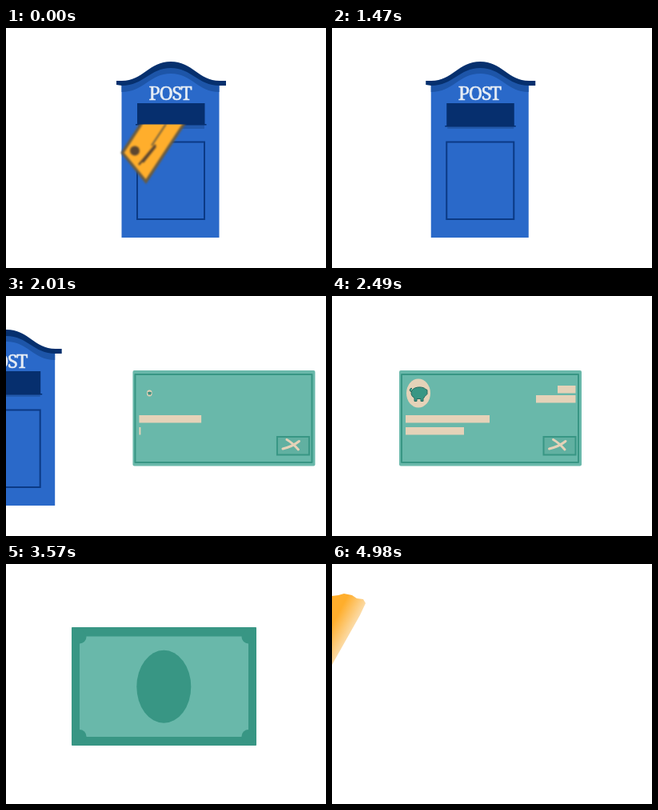
These frames come from a looping animation (400 px wide and 300 px high, 5.01 s). An HTML page:

```html
<!DOCTYPE html>
<html lang="en">
<head>
<meta charset="utf-8">
<title>Post box</title>
<style>
html, body { margin: 0; height: 100%; overflow: hidden; background: #fff; }
svg { display: block; width: 100vw; height: 100vh; }
.light { fill: #69b8aa; }
.dark { fill: #389684; }
.paper { fill: #e5d2b8; }
.soft { filter: blur(.8px); }
</style>
</head>
<body>
<svg viewBox="0 0 400 300">
  <defs>
    <clipPath id="below"><path d="M0 120.5H400V300H0z"/></clipPath>
    <linearGradient id="fade" gradientUnits="userSpaceOnUse" x1="0" y1="76" x2="24" y2="89">
      <stop offset="0" stop-color="#ffae2c"/>
      <stop offset="1" stop-color="#fbe0b4"/>
    </linearGradient>
  </defs>

  <g id="box">
    <path fill="#2a69c9" d="M144.500 70C172 70 180 46 206 46S240 70 266.500 70V262H144.500z"/>
    <path fill="#1d55a8" d="M144.500 70C172 70 180 46 206 46S240 70 266.500 70V80C240 80 232 57 206 57S172 80 144.500 80z"/>
    <path fill="#06306e" d="M138 66H145C171 66 179 42 206 42S241 66 267 66H275V72H267C240 72 232 50 206 50S172 72 145 72L138 71z"/>
    <text x="205" y="90" text-anchor="middle" font-family="'Noto Serif', serif" font-size="23.500" letter-spacing="-1.400" fill="#e6edf5" stroke="#e6edf5" stroke-width=".6">POST</text>
    <path fill="#2259ac" d="M165 119H248V126H165z"/>
    <path id="slot" fill="#062f6e"/>
    <path fill="none" stroke="#0b3a85" stroke-width="2" d="M164 142.500H248V239H164z"/>
  </g>

  <g clip-path="url(#below)">
    <g id="card" class="soft">
      <path fill="#ffae2c" stroke="#6b5c40" stroke-width="3.500" d="M145.500 156L175 192L240 93 210 57z"/>
      <ellipse cx="161" cy="153.500" rx="6" ry="6" fill="#5c4630"/>
      <path fill="none" stroke="#5c4630" stroke-width="2.500" d="M166 171L187 146M171 168L187 148"/>
      <path fill="none" stroke="#6b5c40" stroke-width="2" d="M182 147L200 120"/>
    </g>
    <g id="bill" class="soft"></g>
  </g>

  <g id="doc">
    <rect id="edge" class="light" rx="2"/>
    <rect id="frame" class="dark" rx="1"/>
    <rect id="inner" class="light"/>
    <g id="cheque">
      <g id="logo">
        <ellipse class="paper" rx="15" ry="18"/>
        <path class="dark" stroke="#246b60" d="M-9 0C-9 -9 6 -9 9 -5L11 -4V1L8 4 6 7V10H3V7H-2V10H-5V6C-8 4 -9 2 -9 0zM-9 -2C-12 -2 -11 -7 -8 -6"/>
      </g>
      <g id="bars" class="paper"></g>
      <rect x="264.500" y="176" width="40" height="22.500" fill="#61b0a1" stroke="#389684" stroke-width="2"/>
      <path fill="none" stroke="#e5d2b8" stroke-width="3" stroke-linecap="round" d="M271.500 191Q284 188 292 181.500M276.500 179.500Q283 183 291 192"/>
    </g>
    <g id="corners" class="dark"></g>
    <ellipse id="oval" class="dark" cx="197.300" cy="153.300"/>
  </g>

  <path id="smear" fill="url(#fade)" d="M0 40L8 39 15 37 25 39 31 43 39 44 42 49 35 64 0 126z"/>
</svg>
<script>
const LOOP = 5010;
const $ = id => document.getElementById(id);
const set = (el, attrs) => { for (const k in attrs) el.setAttribute(k, attrs[k]); };
const show = (id, on) => $(id).setAttribute('visibility', on ? 'visible' : 'hidden');
const move = (id, x, y = 0) => $(id).setAttribute('transform', `translate(${x} ${y})`);
const part = (t, a, b) => Math.min(1, Math.max(0, (t - a) / (b - a)));
const smooth = p => p * p * (3 - 2 * p);
const out = p => 1 - (1 - p) ** 2;

// x, y, width, start of growth, anchored right
const BARS = [[92, 149, 105, 1900], [92, 164, 73, 2007], [282, 112, 22.5, 2100, 1], [255, 124, 49.5, 2170, 1]];
const CORNERS = [[92, 91], [303, 91], [92, 215.5], [303, 215.5]];

$('bars').innerHTML = BARS.map(() => '<rect height="9.500"/>').join('');
const dots = r => CORNERS.map(([x, y]) => `<circle cx="${x}" cy="${y}" r="${r}"/>`).join('');
$('corners').innerHTML = dots(0);
$('bill').innerHTML = `<g transform="matrix(.294 .307 -.155 .27 239.5 177) translate(-197.5 -153)">
  <path class="dark" d="M82 79H313V227H82z"/><path class="light" d="M92 90.500H303V216H92z"/>
  <g class="dark">${dots(8.5)}<ellipse cx="197.300" cy="153.300" rx="34" ry="45.500"/></g></g>`;

function blend(id, from, to, p) {
  ['x', 'y', 'width', 'height'].forEach((k, i) =>
    $(id).setAttribute(k, from[i] + (to[i] - from[i]) * p));
}

function draw(t) {
  show('box', t < 2190);
  move('box', -0.032 * Math.max(0, t - 1350) ** 1.35);

  const slip = smooth(part(t, 0, 420));
  show('card', t < 420);
  move('card', 50 * slip, -77 * slip);

  const far = 1 - part(t, 840, 900), drop = smooth(part(t, 900, 1260));
  show('bill', t >= 840 && t < 1260);
  move('bill', 102 * far - 110 * drop, 20 * far - 115 * drop);

  const lip = 117 + 3 * (1 - slip) + 5 * smooth(part(t, 1000, 1300));
  $('slot').setAttribute('d', `M164 94H248.5V${lip}H250.5V${lip + 1.5}H162V${lip}H164z`);

  show('doc', t >= 1590 && t < 4740);
  move('doc', 316 * (1 - part(t, 1590, 2408)) ** 2, 225 * part(t, 4380, 4740) ** 2);

  const morph = smooth(part(t, 2730, 3120));
  blend('edge', [84, 93, 228, 119.5], [82, 79, 231, 148], morph);
  blend('frame', [86, 97, 223, 112], [82, 79, 231, 148], morph);
  blend('inner', [88, 99, 219, 108], [92, 90.5, 211, 125.5], morph);

  const leave = part(t, 2700, 2900);
  $('cheque').setAttribute('opacity', 1 - leave);
  BARS.forEach(([x, y, w, start, right], i) => {
    const len = w * part(t, start, start + 150) * (1 - leave);
    set($('bars').children[i], { x: right ? x + w - len : x, y, width: len });
  });
  const size = smooth(part(t, 1950, 2150)) * (1 - leave);
  $('logo').setAttribute('transform', `translate(${104 + 4 * size} 121.5) scale(${size})`);

  const grow = out(part(t, 2900, 3300));
  set($('oval'), { rx: 34 * grow, ry: 45.5 * grow });
  const round = out(part(t, 3050, 3450));
  for (const dot of $('corners').children) dot.setAttribute('r', 8.5 * round);

  show('smear', t >= 4965);
}

const begin = performance.now();
function tick() {
  draw((performance.now() - begin) % LOOP);
  requestAnimationFrame(tick);
}
tick();
</script>
</body>
</html>
```
